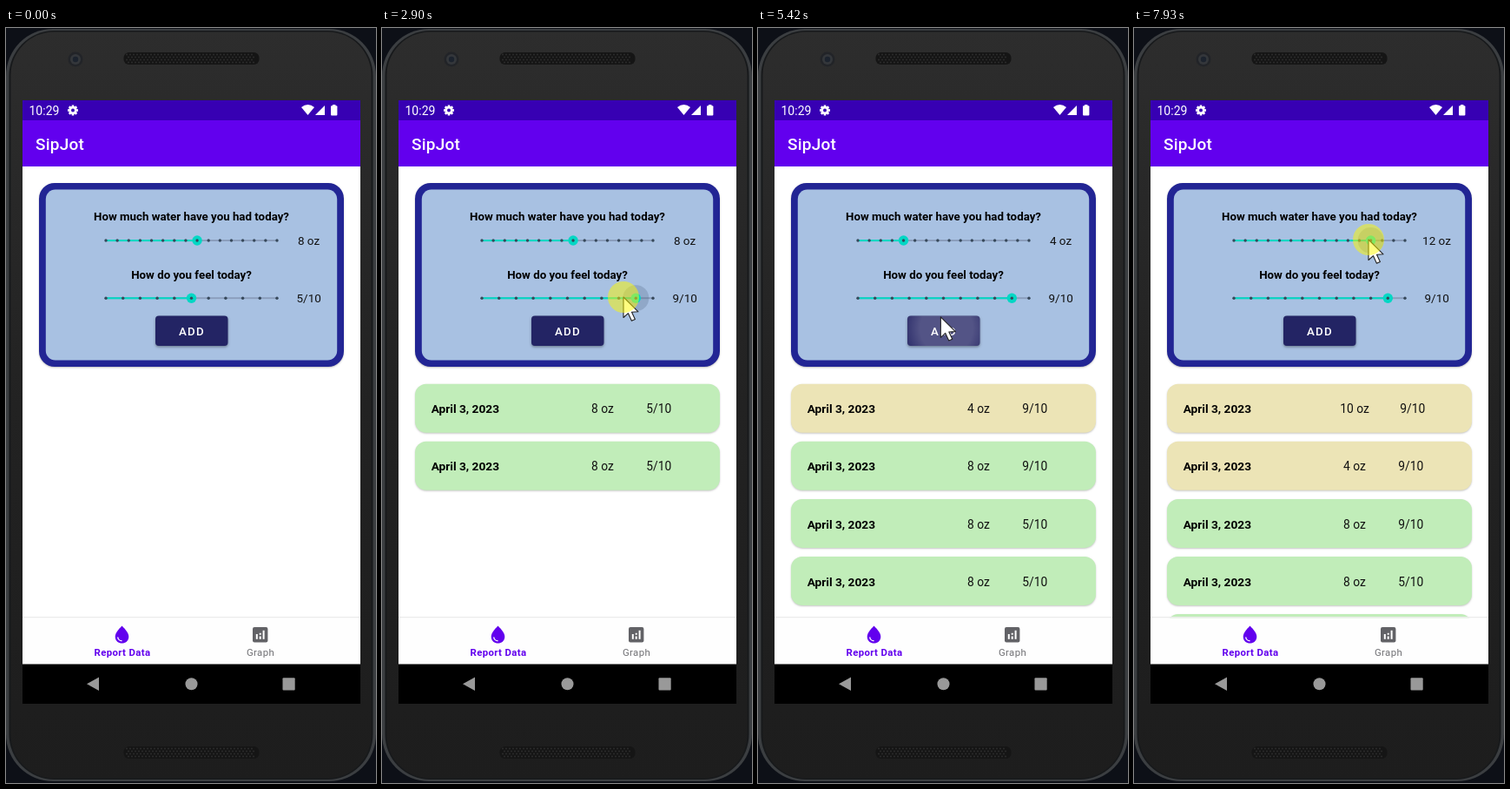
An HTML page with a canvas for the animation above (8000 ms loop, 426 by 867 pixels).

```html
<!DOCTYPE html>
<html lang="en">
<head>
<meta charset="utf-8">
<title>Water tracker</title>
<style>
html, body { margin: 0; width: 100%; height: 100%; overflow: hidden; background: #0d1017; }
canvas { display: block; width: 426px; height: 867px; }
</style>
</head>
<body>
<canvas id="stage"></canvas>
<script>
const W = 426, H = 867, LOOP = 8000;
const canvas = document.getElementById('stage');
const dpr = window.devicePixelRatio || 1;
canvas.width = W * dpr;
canvas.height = H * dpr;
const c = canvas.getContext('2d');

const TEAL = '#03d7c4', PURPLE = '#6200ee', GREEN = '#c1edb9', TAN = '#ece4b6';
const TRACK = { x: 115, w: 197 };

// pointer path: time, x, y
const path = [
  [120, 402, 745], [400, 330, 600], [750, 230, 311], [890, 226, 337],
  [1960, 226, 337], [2200, 213, 309], [2340, 213, 309], [2700, 291, 309],
  [2800, 291, 309], [2900, 278, 309], [3170, 232, 345], [3330, 232, 345],
  [3460, 239, 293], [3600, 220, 242], [4230, 220, 241], [4300, 220, 241],
  [4500, 167, 241], [4580, 167, 243], [4720, 186, 297], [5000, 217, 345],
  [5300, 217, 345], [5840, 165, 242], [5910, 164, 239], [5980, 164, 239],
  [6180, 246, 239], [6230, 246, 239], [6330, 237, 254], [6640, 224, 343],
  [6920, 224, 343], [7350, 246, 236], [7580, 246, 236], [7800, 272, 240],
  [7930, 270, 243]
];
// button presses: down, up; a new row appears on up
const clicks = [[1160, 1400], [1640, 1790], [3250, 3350], [5140, 5280], [6750, 6890]];
const rows = [[8, 5], [8, 5], [8, 9], [4, 9], [10, 9]];
const drags = [[2270, 2950], [4230, 4560], [5910, 6230], [7440, LOOP]];
// drag moves: start, end, from, to
const moves1 = [[4300, 4500, 8, 4], [5980, 6180, 4, 10], [7580, 7800, 10, 12]];
const moves2 = [[2340, 2700, 5, 9]];
const focus1 = [[4230, 5140], [5910, 6750], [7440, LOOP + 400]];
const focus2 = [[2270, 3250]];

const clamp = v => Math.max(0, Math.min(1, v));
const ease = v => v * v * (3 - 2 * v);
const mix = (a, b, k) => a + (b - a) * k;
const within = (list, t) => list.some(([a, b]) => t >= a && t < b);

function pointer(t) {
  if (t < path[0][0]) return null;
  for (let i = 1; i < path.length; i++) {
    const [t0, x0, y0] = path[i - 1], [t1, x1, y1] = path[i];
    if (t <= t1) {
      const k = ease((t - t0) / (t1 - t0));
      return [mix(x0, x1, k), mix(y0, y1, k)];
    }
  }
  return path[path.length - 1].slice(1);
}

function sliderValue(moves, t) {
  let v = moves[0][2];
  for (const [a, b, from, to] of moves)
    if (t >= a) v = Math.round(mix(from, to, ease(clamp((t - a) / (b - a)))));
  return v;
}

function box(x, y, w, h, r, fill) {
  c.beginPath();
  c.roundRect(x, y, w, h, r);
  c.fillStyle = fill;
  c.fill();
}
function rect(x, y, w, h, fill) {
  c.fillStyle = fill;
  c.fillRect(x, y, w, h);
}
function disc(x, y, r, fill) {
  c.beginPath();
  c.arc(x, y, r, 0, Math.PI * 2);
  c.fillStyle = fill;
  c.fill();
}
function poly(points, fill) {
  c.beginPath();
  points.forEach(([x, y]) => c.lineTo(x, y));
  c.closePath();
  c.fillStyle = fill;
  c.fill();
}
function text(s, x, y, size, weight, fill, align = 'left', spacing = 0) {
  c.font = `${weight} ${size}px Roboto, sans-serif`;
  c.textAlign = align;
  c.letterSpacing = spacing + 'px';
  c.fillStyle = fill;
  c.fillText(s, x, y);
}
function shadow(blur, y, alpha) {
  c.shadowColor = `rgba(0,0,0,${alpha})`;
  c.shadowBlur = blur * dpr;
  c.shadowOffsetY = y * dpr;
}
const noShadow = () => { c.shadowColor = 'transparent'; };

function speaker(y) {
  box(135.5, y, 156, 14, 6, '#151515');
  for (let j = 0; j < 4; j++)
    for (let i = 0; i < 37; i++)
      disc(139 + i * 4 + (j % 2) * 2, y + 2.5 + j * 3, 0.9, '#303030');
}

function phone() {
  rect(0, 0, W, H, '#0d1017');
  box(0, 1, W, 864, 54, '#3b3e41');
  box(3.5, 3, W - 7, 860, 52, '#17191b');
  const g = c.createLinearGradient(0, 0, 0, H);
  g.addColorStop(0, '#2d2d2d');
  g.addColorStop(0.5, '#222222');
  g.addColorStop(1, '#1d1d1d');
  box(5.5, 4.5, W - 11, 857, 50, g);
  disc(80, 36, 8.5, '#222428');
  disc(80, 36, 6, '#34373b');
  disc(80, 36, 3.2, '#1c232e');
  speaker(28);
  speaker(825);
}

function statusBar() {
  rect(19, 83, 389, 24, '#3700b3');
  rect(19, 106, 389, 53, PURPLE);
  text('10:29', 26.5, 99.5, 14, 400, '#fff');
  for (let i = 0; i < 4; i++) {
    c.save();
    c.translate(77, 94.5);
    c.rotate(i * Math.PI / 4);
    rect(-1.3, -6, 2.6, 12, '#fff');
    c.restore();
  }
  disc(77, 94.5, 4.7, '#fff');
  disc(77, 94.5, 2, '#3700b3');
  c.beginPath();
  c.moveTo(347.5, 100);
  c.lineTo(340, 91);
  c.quadraticCurveTo(347.5, 85, 355, 91);
  c.closePath();
  c.fillStyle = '#fff';
  c.fill();
  poly([[356, 100], [367, 89], [367, 100]], '#fff');
  box(374, 89.2, 7.4, 11.3, 1, '#fff');
  rect(376, 88, 3.4, 2, '#fff');
  text('SipJot', 34, 140, 19, 500, '#fff', 'left', 0.2);
}

function slider(y, steps, value, focus, t) {
  const step = TRACK.w / steps, x = TRACK.x + value * step;
  rect(TRACK.x, y - 1, TRACK.w, 2, '#8b9ebd');
  rect(TRACK.x, y - 1, x - TRACK.x, 2.1, TEAL);
  for (const [a, b] of focus) {
    const k = Math.min(clamp((t - a) / 120), 1 - clamp((t - b) / 200));
    if (k > 0) disc(x, y, mix(8, 15, clamp((t - a) / 120)), `rgba(20,40,70,${0.16 * k})`);
  }
  disc(x, y, 5.7, TEAL);
  for (let i = 0; i <= steps; i++) disc(TRACK.x + i * step, y, 1.7, '#36485a');
}

function ripple(t) {
  const hit = clicks.filter(k => t >= k[0]).pop();
  if (!hit) return;
  const dt = t - hit[0];
  const alpha = 0.22 * clamp(dt / 80) * (1 - clamp((t - hit[1] - 180) / 350));
  if (alpha <= 0) return;
  const [x, y] = pointer(hit[0]), r = 10 + dt * 0.16;
  const spread = dt > 300 ? 400 : r;
  const g = c.createRadialGradient(x, y, 0, x, y, spread);
  g.addColorStop(0, `rgba(255,255,255,${alpha})`);
  g.addColorStop(0.55, `rgba(255,255,255,${alpha})`);
  g.addColorStop(1, 'rgba(255,255,255,0)');
  box(172, 330.5, 83.5, 34.5, 4, g);
}

function form(t) {
  const water = sliderValue(moves1, t), mood = sliderValue(moves2, t);
  shadow(2, 1, 0.25);
  box(38, 178, 351, 211, 18, '#222594');
  noShadow();
  box(45.8, 185.5, 335.4, 196, 11, '#a8c1e2');
  text('How much water have you had today?', 213.5, 221.3, 13.3, 700, '#000', 'center');
  slider(244, 15, water, focus1, t);
  text(water + ' oz', 348.5, 249, 13.5, 400, '#111', 'center');
  text('How do you feel today?', 213.5, 287.5, 13.3, 700, '#000', 'center');
  slider(310.2, 10, mood, focus2, t);
  text(mood + '/10', 348.7, 315.3, 13.5, 400, '#111', 'center');
  shadow(3, 1.5, 0.35);
  box(172, 330.5, 83.5, 34.5, 4, '#232464');
  noShadow();
  ripple(t);
  text('ADD', 199, 352.8, 13.3, 500, '#fff', 'left', 1.2);
}

function cards(t) {
  const count = clicks.filter(k => t >= k[1]).length;
  rows.slice(0, count).reverse().forEach(([water, mood], i) => {
    const y = 408.7 + i * 66.1;
    shadow(2, 1, 0.22);
    box(38, y, 351, 56, 13, water === 8 ? GREEN : TAN);
    noShadow();
    text('April 3, 2023', 56.7, y + 33.6, 13.7, 700, '#000');
    text(water + ' oz', 254, y + 33.6, 13.8, 400, '#111', 'center');
    text(mood + '/10', water > 9 ? 320.7 : 318.7, y + 33.6, 13.8, 400, '#111', 'center');
  });
}

function tabs() {
  rect(19, 676, 389, 1.5, '#ececec');
  rect(19, 677.5, 389, 53, '#fefefe');
  c.beginPath();
  c.moveTo(133.5, 686.5);
  c.bezierCurveTo(138, 691, 141.3, 695, 141.3, 699);
  c.bezierCurveTo(141.3, 709, 125.7, 709, 125.7, 699);
  c.bezierCurveTo(125.7, 695, 129, 691, 133.5, 686.5);
  c.fillStyle = PURPLE;
  c.fill();
  c.beginPath();
  c.arc(133.5, 699, 4.8, Math.PI * 0.5, Math.PI * 0.97);
  c.strokeStyle = '#fff';
  c.lineWidth = 1.4;
  c.stroke();
  text('Report Data', 134, 721, 11.4, 700, PURPLE, 'center', 0.36);
  box(284, 688, 17.4, 17.4, 2, '#626266');
  rect(287.8, 696, 2, 5.8, '#fff');
  rect(291.7, 698.5, 2, 3.3, '#fff');
  rect(291.7, 694.8, 2, 2, '#fff');
  rect(295.6, 691.8, 2, 10, '#fff');
  text('Graph', 293, 721, 11.4, 400, '#707074', 'center', 0.36);
  rect(19, 730.5, 389, 45.5, '#000');
  poly([[93, 753.3], [107, 745.5], [107, 761]], '#999');
  disc(213.5, 753.3, 7, '#999');
  box(318.5, 746.3, 14.2, 14.2, 1, '#999');
}

function cursor(t) {
  const p = pointer(t);
  if (!p) return;
  c.save();
  c.translate(p[0], p[1]);
  poly([[0, 0], [0, 23.5], [5.4, 18.6], [9.4, 27.2], [13.4, 25.4], [9.5, 17.2], [17, 16.8]], '#fff');
  c.lineJoin = 'round';
  c.strokeStyle = '#222';
  c.lineWidth = 1.1;
  c.stroke();
  c.restore();
  if (within(clicks, t) || within(drags, t)) disc(p[0], p[1], 18, 'rgba(255,250,0,.5)');
}

function draw(now) {
  const t = now % LOOP;
  c.setTransform(dpr, 0, 0, dpr, 0, 0);
  phone();
  rect(19, 83, 389, 692, '#fff');
  statusBar();
  form(t);
  cards(t);
  tabs();
  cursor(t);
  requestAnimationFrame(draw);
}
requestAnimationFrame(draw);
</script>
</body>
</html>
```
